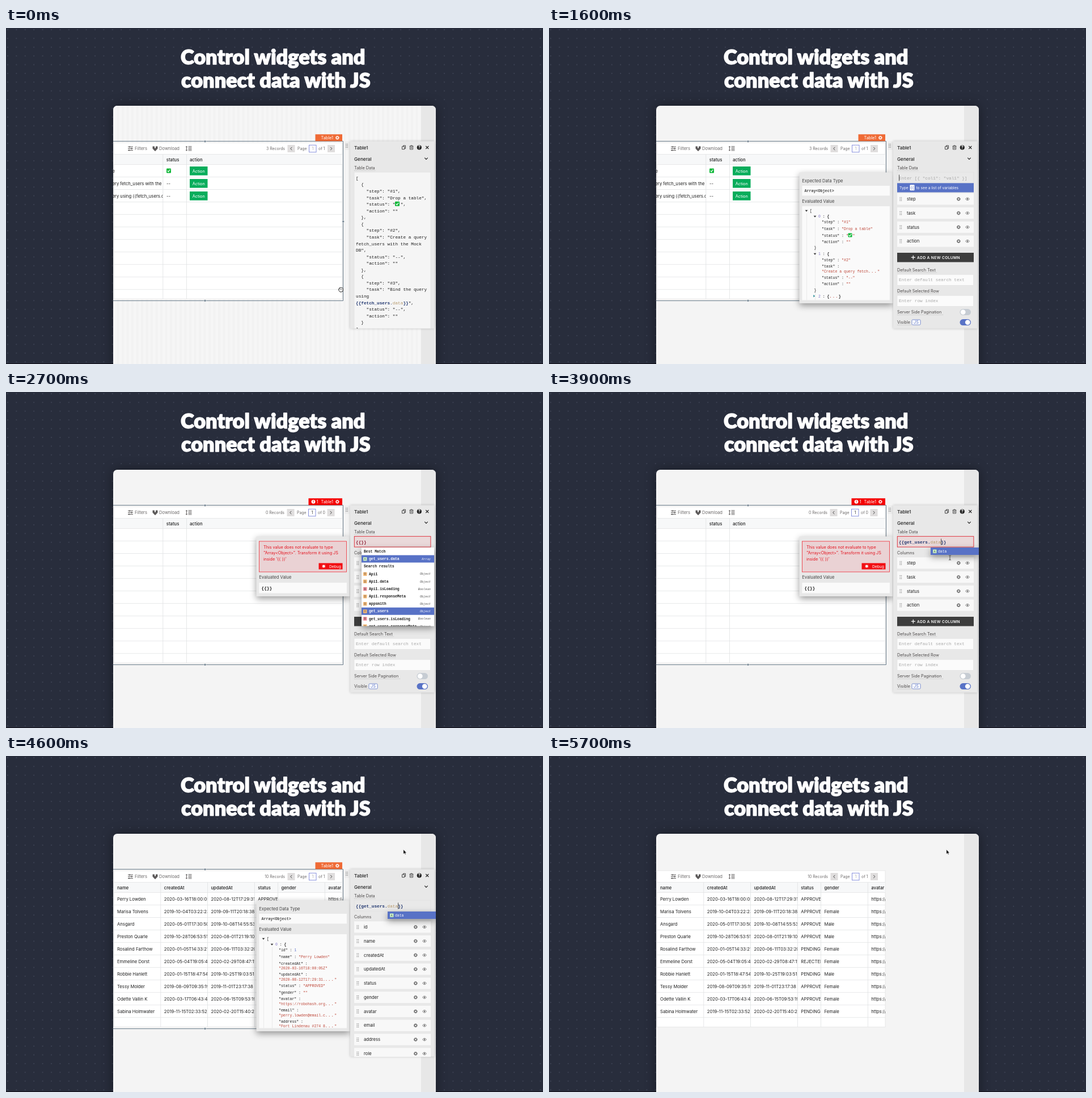
Write an HTML page that moves like this. It is 947 px wide and 592 px high and loops after 6.7 s.

```html
<!DOCTYPE html>
<html lang="en">
<head>
<meta charset="utf-8">
<title>Control widgets and connect data with JS</title>
<style>
html, body { margin: 0; width: 100%; height: 100%; overflow: hidden; background: #282d3c; }
svg { display: block; }
text { font-family: Inter, Roboto, sans-serif; font-size: 7.7px; fill: #1f1f1f; white-space: pre; }
.title { font: 900 36px Lato, sans-serif; fill: #fff; stroke: #fff; stroke-width: 1.4px; stroke-linejoin: round; }
.head { font-weight: 500; }
.tool { font-size: 7.6px; fill: #6d6a6a; }
.page { font-size: 6.9px; fill: #6d6a6a; }
.panel { font-size: 8.2px; font-weight: 500; }
.label { font-size: 7.3px; fill: #4b4848; }
.white { fill: #fff; font-size: 7.3px; }
.error { fill: #e3101c; font-size: 7.2px; }
.code, .tree, .list, .kind { font-family: "Liberation Mono", "DejaVu Sans Mono", monospace; }
.code { font-size: 7.73px; }
.tree { font-size: 6.5px; }
.list { font-size: 6.4px; font-weight: 700; }
.kind { font-size: 5.3px; font-style: italic; fill: #555; }
.faint { fill: #a9a9a9; }
.bold { font-weight: 700; }
.lit { fill: #fff; }
.card { filter: drop-shadow(0 0 10px rgba(0,0,0,.4)); }
.side { filter: drop-shadow(0 0 2px rgba(0,0,0,.2)); }
.shadow { filter: drop-shadow(0 4px 6px rgba(0,0,0,.4)); }
</style>
</head>
<body>
<script>
const LOOP = 6700, BLUE = '#5872c6', NAVY = '#20366f', GREY = '#e8e8e8';
let css = '', layers = 0;

// Opacity steps, keyed by time in ms.
const layer = (steps, body) => {
  const id = 'layer' + layers++;
  const keys = Object.entries({ 0: 0, ...steps })
    .map(([t, o]) => `${Math.max(0, t - 4) / LOOP * 100}% { opacity: ${o} }`);
  css += `@keyframes ${id} { ${keys.join(' ')} }\n`;
  return `<g style="animation: ${id} ${LOOP}ms step-end infinite">${body}</g>`;
};
const during = (from, to, body) => layer({ [from]: 1, [to]: 0 }, body);
const each = (list, draw) => list.map(draw).join('');
const text = (x, y, s, cls = '', extra = '') => `<text x="${x}" y="${y}" class="${cls}" ${extra}>${s}</text>`;
const rect = (x, y, w, h, fill, extra = '') => `<rect x="${x}" y="${y}" width="${w}" height="${h}" fill="${fill}" ${extra}/>`;
const dot = (x, y, r, fill, extra = '') => `<circle cx="${x}" cy="${y}" r="${r}" fill="${fill}" ${extra}/>`;
const path = (d, color, width = 1, x = 0, y = 0) =>
  `<path d="${d}" transform="translate(${x} ${y})" fill="none" stroke="${color}" stroke-width="${width}"/>`;
const shape = (d, fill, x = 0, y = 0, extra = '') => `<path d="${d}" transform="translate(${x} ${y})" fill="${fill}" ${extra}/>`;
const crop = (x, y, w, h, body) =>
  `<svg x="${x}" y="${y}" width="${w}" height="${h}" viewBox="${x} ${y} ${w} ${h}">${body}</svg>`;
const span = (s, color, extra = '') => `<tspan fill="${color}" ${extra}>${s}</tspan>`;

// Icons
const gear = (x, y, color) => dot(x, y, 2, 'none', `stroke="${color}" stroke-width="1.3"`) +
  dot(x, y, 3, 'none', `stroke="${color}" stroke-width="1" stroke-dasharray="1.2 1.156"`);
const eye = (x, y) => path('M-3.5 0Q0-4.6 3.5 0Q0 4.6-3.5 0Z', '#666', .8, x, y) + dot(x, y, 1.2, '#666');
const grip = (x, y) => each([-2.7, 0, 2.7], d => dot(x - 1.2, y + d, .7, '#777') + dot(x + 1.2, y + d, .7, '#777'));
const tick = (x, y, s = 8) => rect(x - s / 2, y - s / 2, s, s, '#10b83a', 'rx="1"') +
  path('M-2.2 0L-.6 1.9L2.3-2', '#fff', 1.2, x, y);
const ibeam = (x, y) => path('M-2-4Q0-4 0-3Q0-4 2-4M0-3V3M-2 4Q0 4 0 3Q0 4 2 4', '#333', .8, x, y);
const arrow = (x, y) => shape('M0 0V8L1.9 6.3L3.1 9L4.4 8.4L3.2 5.9H5.6Z', '#111', x, y, 'stroke="#fff" stroke-width=".5"');
const hand = shape('M-4 0Q-4-2-2.5-1.5V-3Q-1.5-4.5-.8-3.3Q.4-4.8 1.2-3.3Q2.4-4.3 3-2.7Q4.2-2.8 4 0Q4 4 1 4H-1.5Q-3 3-4 0Z', '#fff', 590.5, 461, 'stroke="#222" stroke-width="1"') +
  path('M-1.5-1.5V0M.2-1.7V0M1.9-1.5V0', '#222', .7, 590.5, 461);

// Table
const ROWS = [
  ['Perry Lowden', '2020-03-16T18:00:05', '2020-08-12T17:29:31', 'APPROVED', ''],
  ['Marisa Tolvens', '2019-10-04T03:22:23', '2019-09-11T20:18:38', 'APPROVED', 'Female'],
  ['Ansgard', '2020-05-01T17:30:50', '2019-10-08T14:55:53', 'APPROVED', 'Male'],
  ['Preston Quarle', '2019-10-28T06:53:51', '2020-08-01T21:19:10', 'APPROVED', 'Male'],
  ['Rosalind Farthow', '2020-01-05T14:33:21', '2020-06-11T03:32:20', 'PENDING', 'Female'],
  ['Emmeline Dorst', '2020-05-04T19:05:41', '2020-02-29T08:47:11', 'REJECTED', 'Female'],
  ['Robbie Hanlett', '2020-01-15T18:47:54', '2019-10-25T19:03:51', 'PENDING', 'Male'],
  ['Tessy Molder', '2019-08-09T09:35:19', '2019-11-01T23:17:38', 'APPROVED', 'Female'],
  ['Odette Vallin K', '2020-03-17T06:43:41', '2020-06-15T09:53:19', 'APPROVED', 'Female'],
  ['Sabina Holmwater', '2019-11-15T02:33:52', '2020-02-20T15:40:21', 'PENDING', 'Female']
];
const COLS = [['name', 190], ['createdAt', 272.8], ['updatedAt', 355.5], ['status', 438.3], ['gender', 479.5], ['avatar', 562.3]];
const rowY = i => 254.6 + i * 22.03;
const rule = x => rect(x - .4, 223, .8, 254, '#dfe1e3');

const tableFrame = rect(190, 202, 403, 275.5, '#fff', 'stroke="#e4e4e4" stroke-width=".8"') +
  rect(190, 222.5, 403, 18, '#f7f8f9') +
  each([222.5, 240.5, ...ROWS.map((_, i) => rowY(i) + 7.9)], y => rect(190, y - .4, 403, .8, '#e2e4e5')) +
  path('M215 209.5H224M215 212.5H224M215 215.5H224M218 208V211M221.5 211V214M217 214V217', '#5d5a5a', 1) +
  text(227, 215.2, 'Filters', 'tool') +
  shape('M-4.5-4H-1V-1H1V-4H4.5V0L0 4.8L-4.5 0Z', '#5d5a5a', 263, 212.5) +
  text(270, 215.2, 'Download', 'tool') +
  path('M-3.6-4V4M-5-2.5L-3.6-4L-2.2-2.5M-5 2.5L-3.6 4L-2.2 2.5M-.5-3.5H5.5M-.5-1.2H5.5M-.5 1.2H5.5M-.5 3.5H5.5', '#5d5a5a', 1, 322, 212.3);

const pager = (count, pages, shift, ink) => text(492 + shift, 215, count + ' Records', 'page', 'text-anchor="end"') +
  rect(496.5 + shift, 206, 13, 13, '#e0dede') + path('M1.3-2.6L-1.3 0L1.3 2.6', '#444', 1, 503 + shift, 212.5) +
  text(514 + shift, 215, 'Page', 'page') +
  rect(534.5 + shift, 206.3, 12.5, 12.5, '#fff', 'stroke="#8790dc" stroke-width="1"') +
  text(540.8 + shift, 215, 1, 'page', `text-anchor="middle" style="fill:${ink}"`) +
  text(551 + shift, 215, 'of ' + pages, 'page') +
  rect(567 + shift * .5, 206, 13, 13, '#e0dede') + path('M-1.3-2.6L1.3 0L-1.3 2.6', '#444', 1, 573.5 + shift * .5, 212.5);

const stepsHead = rule(276.8) + rule(318.4) + text(282.8, 234.6, 'status', 'head') + text(324, 234.6, 'action', 'head');
const stepsRows = crop(189, 240, 87.5, 70,
  each(['e', 'ery fetch_users with the', 'ery using {{fetch_users.data}}'], (s, i) => text(187.4, rowY(i), s))) +
  tick(287, 251.5) + text(283, rowY(1), '--') + text(283, rowY(2), '--') +
  each([0, 1, 2], i => rect(324, rowY(i) - 10.6, 31.5, 15.6, '#08ad5b') + text(339.8, rowY(i), 'Action', 'white', 'text-anchor="middle"'));

const users = each(COLS, ([name, x], c) => rule(x) +
  crop(x, 223, (COLS[c + 1]?.[1] ?? 593) - x, 254, text(x + 6, 234.6, name, 'head') +
    each(ROWS, (row, i) => text(x + 6, rowY(i), row[c] ?? 'https://'))));

// Selection outline and tag
const outline = path('M189 199.5H594.5V480.5H189', '#6a7c8b', 1) +
  each([[351, 199.7], [351, 480.5], [594.7, 341]], ([x, y]) => dot(x, y, 1.8, '#6a7c8b', 'stroke="#fff" stroke-width=".4"')) +
  rect(597, 200, 9, 15, '#ededed') + grip(601, 207.5);
const tag = (x, fill) => rect(x, 187.3, 593 - x, 12, fill) + text(555.5, 196, 'Table1', 'white') + gear(584.3, 193.3, '#fff');
const errorTag = tag(533.5, '#f50505') + dot(542, 193.3, 3.4, '#fff') +
  rect(541.5, 191, 1, 2.8, '#f50505') + rect(541.5, 194.5, 1, 1, '#f50505') + text(547.5, 196, '1', 'white');

// Property panel
const label = (y, s) => text(614, y, s, 'label') +
  `<path d="M614 ${y + 2}h${s.length * 3.7}" stroke="#888" stroke-width=".5" stroke-dasharray="1 1"/>`;
const panel = rect(607, 199.5, 148.5, 330, GREY, 'class="side"') +
  text(614, 213.6, 'Table1', 'panel') + text(614, 233.6, 'General', 'panel') + label(249, 'Table Data') +
  path('M-1-1.5V-3.2H3V2H1.5M-3-1.5H1.2V3.4H-3Z', '#333', .9, 701.5, 210.3) +
  path('M-3.5-2.3H3.5M-1.3-2.3V-3.5H1.3V-2.3M-2.6-2.3V3.4H2.6V-2.3M-.8-.8V2M.8-.8V2', '#333', .8, 715, 210.5) +
  dot(728.8, 210.5, 4.1, '#222') + text(728.8, 213, '?', 'white bold', 'text-anchor="middle"') +
  path('M-2.5-2.5L2.5 2.5M2.5-2.5L-2.5 2.5', '#222', 1.1, 742.8, 210.5) +
  path('M-2.7-1.3L0 1.4L2.7-1.3', '#222', 1.2, 741, 230);

const item = (step, task, status) =>
  ['  {', `    "step": "#${step}",`, ...task, `    "status": "${status}",`, '    "action": ""'];
const bound = span('{{fetch_users', NAVY, 'class="bold"') + span('.', NAVY) + span('data', '#b5986a') + span('}}', NAVY, 'class="bold"');
const source = ['[', ...item(1, ['    "task": "Drop a table",'], '  '), '  },',
  ...item(2, ['    "task": "Create a query', 'fetch_users with the Mock', 'DB",'], '--'), '  },',
  ...item(3, ['    "task": "Bind the query', 'using', bound + '",'], '--'), '  }', ']'];
const jsonEditor = rect(614, 254, 135, 275.5, '#f5f5f5', 'stroke="#dedede" stroke-width=".6"') +
  crop(614, 254, 135, 275.5, each(source, (s, i) => text(617, 266.8 + i * 11.57, s, 'code')) + tick(690, 309.8));

const column = (name, i) => {
  const y = 301.3 + i * 24.78;
  return rect(614, y - 10, 135, 20, '#f8f8f8') + grip(620.3, y) + text(631, y + 2.7, name) + gear(722.3, y, '#666') + eye(738, y);
};
const toggle = (y, on) => rect(724.5, y - 5.5, 19.5, 11, on ? BLUE : '#c6ccd3', 'rx="5.5"') + dot(on ? 738.3 : 730.2, y, 4.4, '#fff');
const field = (y, s) => rect(614, y, 134.5, 19, '#fbfbfb', 'stroke="#e0e0e0" stroke-width=".6"') + text(617, y + 12, s, 'code faint');
const form = each(['step', 'task', 'status', 'action'], column) +
  rect(614, 396, 135, 16.5, '#3d3d3d') + path('M-3.5 0H3.5M0-3.5V3.5', '#fff', 1.2, 642.3, 404.2) +
  text(649, 406.7, 'ADD A NEW COLUMN', 'white', 'style="font-size:6.7px;font-weight:600;letter-spacing:.35px"') +
  label(429, 'Default Search Text') + field(434.3, 'Enter default search text') +
  label(466, 'Default Selected Row') + field(471.3, 'Enter row index') +
  label(503.3, 'Server Side Pagination') + toggle(500.6, false) +
  label(521.2, 'Visible') + rect(640, 514, 15, 9, '#fff', `rx="1.5" stroke="${BLUE}" stroke-width=".8"`) +
  text(647.5, 521, 'JS', 'label', `text-anchor="middle" style="fill:${BLUE}"`) + toggle(518.6, true);
const userColumns = crop(607, 289, 148, 240.5,
  each(['id', 'name', 'createdAt', 'updatedAt', 'status', 'gender', 'avatar', 'email', 'address', 'role'], column));

const input = s => text(617, 266.6, s, 'code');
const caret = x => rect(x, 258.5, .8, 11, '#222');
const inputBox = rect(614, 254, 135, 19, '#e9e9e9', 'stroke="#dcdcdc" stroke-width=".6"');
const errorBox = rect(614.3, 254.3, 134.6, 18.8, '#ead9da', 'stroke="#e02632" stroke-width=".9"');
const hint = rect(614, 273.3, 135, 16.2, BLUE) + text(618, 284, 'Type', 'white', 'style="font-size:6.7px"') +
  rect(636.5, 276.3, 8, 10, '#fff', 'rx="1"') + text(640.5, 283.7, '{{', 'label', `text-anchor="middle" style="fill:${BLUE}"`) +
  text(647.5, 284, 'to see a list of variables', 'white', 'style="font-size:6.7px"');
const query = (tail = '') => span('{{', NAVY, 'class="bold"') + span('get_users' + (tail && '.'), NAVY, 'class="bold"') +
  span(tail, '#b5986a') + span('}}', NAVY, 'class="bold"');

// Completion list
const KINDS = { Array: ['#c8f0c4', 'A'], Object: ['#f5b873', 'O'], Boolean: ['#ee8b96', 'B'] };
const badge = (x, y, kind) => rect(x - 3, y - 3, 6.5, 6.5, KINDS[kind][0], 'rx=".8"') +
  text(x + .2, y + 2, KINDS[kind][1], 'kind', 'text-anchor="middle" style="font-style:normal"');
const option = (y, name, kind, lit) => (lit ? rect(627, y - 6.5, 128, 13, BLUE) : '') + badge(633, y, kind) +
  text(640, y + 2.2, name, lit ? 'list lit' : 'list') + text(749, y + 2, kind, lit ? 'kind lit' : 'kind', 'text-anchor="end"');
const OPTIONS = [['Api1', 'Object'], ['Api1.data', 'Object'], ['Api1.isLoading', 'Boolean'], ['Api1.responseMeta', 'Object'],
  ['appsmith', 'Object'], ['get_users', 'Object'], ['get_users.isLoading', 'Boolean'], ['get_users.responseMeta', 'Object']];
const menu = rect(627, 274, 128, 138.5, '#fff', 'class="shadow"') + crop(627, 274, 128, 138.5,
  text(631, 283, 'Best Match', 'list') + option(294, 'get_users.data', 'Array', true) +
  text(631, 309.2, 'Search results', 'list') + each(OPTIONS, ([name, kind], i) => option(320.4 + i * 13.16, name, kind)));
const tip = rect(673, 274, 85, 13, BLUE, 'class="shadow"') + badge(680, 280.5, 'Array') + text(686, 283, 'data', 'list lit', 'style="font-weight:400"');

// Value popups
const popup = (h, body) => rect(441.5, 254.5, 165, h, GREY, 'class="shadow"') + body;
const tree = (x, y, s) => text(x, y + 2.2, s, 'tree');
const str = s => span(`"${s}"`, '#bd4537');
const dots = span('...', '#bd4537', 'class="bold" style="letter-spacing:1.5px"');
const long = s => span('"' + s, '#bd4537') + dots + span('"', '#bd4537');
const pair = (y, key, value = '') => tree(481, y, `"${key}" : ${value}`);
const brace = s => span(s, '#222', 'class="bold"');
const index = n => span(n, '#8377c9') + ' : ' + brace('{');
const fold = (x, y) => shape('M-2.3-1.3H2.3L0 1.7Z', '#333', x, y);
const open = (y, n) => fold(469, y) + tree(475, y, index(n));
const close = y => tree(467.5, y, '}');
const heading = (y, s) => text(446.3, y, s, 'tool', 'style="fill:#444"');
const valuePopup = body => popup(230.5, heading(271.6, 'Expected Data Type') +
  rect(446.3, 278, 154.5, 17.3, '#fafafa') + text(450.5, 288.8, 'Array&lt;Object&gt;', 'list', 'style="font-size:6.7px;fill:#444"') +
  heading(307.6, 'Evaluated Value') + rect(446.3, 314, 154.5, 165.5, '#fafafa') +
  crop(446.3, 314, 154.5, 165.5, path('M454.5 327V480M469.5 337V480', '#e3e3e3', .7) +
    fold(454, 322) + tree(460, 322, '[') + open(332, 0) + body));

const stepsPopup = valuePopup(
  pair(342, 'step', str('#1')) + pair(353.7, 'task', str('Drop a table')) + pair(365.3, 'status', str('  ')) + tick(531, 365, 7) +
  pair(376.8, 'action', str('')) + close(387) + open(398, 1) + pair(408.3, 'step', str('#2')) + pair(420, 'task') +
  tree(481, 428.3, long('Create a query fetch')) + pair(439.6, 'status', str('--')) + pair(451, 'action', str('')) + close(461.5) +
  shape('M-1.2-2.3V2.3L1.7 0Z', '#268b96', 467.5, 472.3) + tree(475, 472.5, index(2) + dots + brace('}')));
const usersPopup = valuePopup(
  pair(342, 'id', span('1', '#5a6fc9')) + pair(353.7, 'name', str('Perry Lowden')) +
  pair(365.3, 'createdAt') + tree(481, 373.7, str('2020-03-16T18:00:05Z')) +
  pair(385, 'updatedAt') + tree(481, 393.5, long('2020-08-12T17:29:31.')) +
  pair(405, 'status', str('APPROVED')) + pair(416.5, 'gender', str('')) +
  pair(428, 'avatar') + tree(481, 436.5, long('https://robohash.org')) +
  pair(448, 'email') + tree(481, 456.3, long('perry.lowden@email.c')) +
  pair(467.8, 'address') + tree(481, 476.2, long('Fort Lindenau #274 8')));
const errorPopup = popup(105.5, rect(446.5, 263, 154, 54, '#ead2d4', 'stroke="#ee2a35" stroke-width=".8"') +
  each(['This value does not evaluate to type', '"Array&lt;Object&gt;". Transform it using JS', "inside '{{ }}'"],
    (s, i) => text(454, 275.7 + i * 10.5, s, 'error')) +
  rect(551.5, 301.5, 42, 11, '#f20d12') + dot(560.3, 307, 2, '#fff') +
  path('M-3.2 0H3.2M-2.5-2.5L2.5 2.5M2.5-2.5L-2.5 2.5M0-3V3', '#fff', .8, 560.3, 307) + text(570, 309.6, 'Debug', 'white', 'style="font-size:6.7px"') +
  heading(329.3, 'Evaluated Value') + rect(446.3, 336, 154.5, 18.5, '#fafafa') +
  text(450.5, 348.2, '{{}}', 'code bold'));

const sidePanel = panel +
  during(0, 1600, jsonEditor) +
  layer({ 1000: 1, 1600: 0 }, rect(636, 386, .6, 10, '#444')) +
  during(1600, 4500, form) +
  layer({ 4500: 1 }, userColumns) +
  layer({ 1600: 1 }, inputBox) +
  during(2300, 4500, errorBox) +
  during(1600, 2100, text(617, 266.6, 'Enter [{ "col1": "val1" }]', 'code faint') + caret(617) + hint) +
  layer({ 2100: 1 }, text(614, 286, 'Columns', 'label')) +
  during(2100, 2200, input(span('{}', NAVY, 'class="bold"'))) +
  during(2200, 3200, input(span('{{}}', '#8d1f35', 'class="bold"'))) +
  during(3200, 3900, input(query())) +
  layer({ 3900: 1 }, input(query('data')) + caret(691.3)) +
  during(2500, 3900, menu + during(2700, 3200, option(386.2, 'get_users', 'Object', true))) +
  layer({ 3900: 1 }, tip);

const scene = `
<svg width="947" height="592" viewBox="0 0 947 592">
  <defs>
    <pattern id="dots" width="15.4" height="15.4" patternUnits="userSpaceOnUse">${dot(3, 3, .9, '#474d60')}</pattern>
    <pattern id="stripes" width="8.5" height="8" patternUnits="userSpaceOnUse">${rect(0, 0, 4.2, 8, '#f2f2f2')}${rect(4.2, 0, 4.3, 8, '#f6f6f6')}</pattern>
    <clipPath id="card">${rect(189, 137, 569, 470, '#fff', 'rx="7"')}</clipPath>
  </defs>
  ${rect(0, 0, 947, 592, '#282d3c') + rect(0, 0, 947, 592, 'url(#dots)') + rect(0, 591, 947, 1, '#12101a')}
  ${text(308, 64, 'Control widgets and', 'title') + text(309, 104.5, 'connect data with JS', 'title')}
  ${rect(189, 137, 569, 470, '#f4f4f4', 'rx="7" class="card"')}
  <g clip-path="url(#card)">
    ${layer({ 0: 1, 1000: .6, 1100: 0 }, rect(189, 137, 543, 455, 'url(#stripes)'))}
    ${rect(732, 137, 26, 455, '#e7e7e7')}
    ${tableFrame}
    ${during(0, 4500, stepsHead) + during(0, 2300, stepsRows) + layer({ 4500: 1 }, users)}
    ${during(0, 2300, pager(3, 1, 0, '#a9a9a9')) + during(2300, 4500, pager(0, 0, -1, '#333')) + layer({ 4500: 1 }, pager(10, 1, 0, '#a9a9a9'))}
    ${layer({ 0: 1, 5600: .5, 5700: 0 }, outline + during(2300, 4500, errorTag) +
      layer({ 0: 1, 2300: 0, 4500: 1 }, tag(545.5, '#ef6a35')))}
    ${layer({ 1000: .3, 1100: 1, 2300: 0 }, stepsPopup)}
    ${during(2300, 4500, errorPopup)}
    ${layer({ 4500: 1, 5600: .5, 5700: 0 }, usersPopup)}
    ${layer({ 0: 1, 5600: .5, 5700: 0 }, sidePanel)}
    ${during(0, 1100, hand) + during(1000, 1600, ibeam(656, 387)) + during(3900, 4400, ibeam(707, 292))}
    ${during(4400, 4500, arrow(703, 228)) + layer({ 4500: 1 }, arrow(700.8, 164.8))}
  </g>
</svg>`;
document.head.insertAdjacentHTML('beforeend', `<style>${css}</style>`);
document.body.innerHTML = scene;
</script>
</body>
</html>
```
